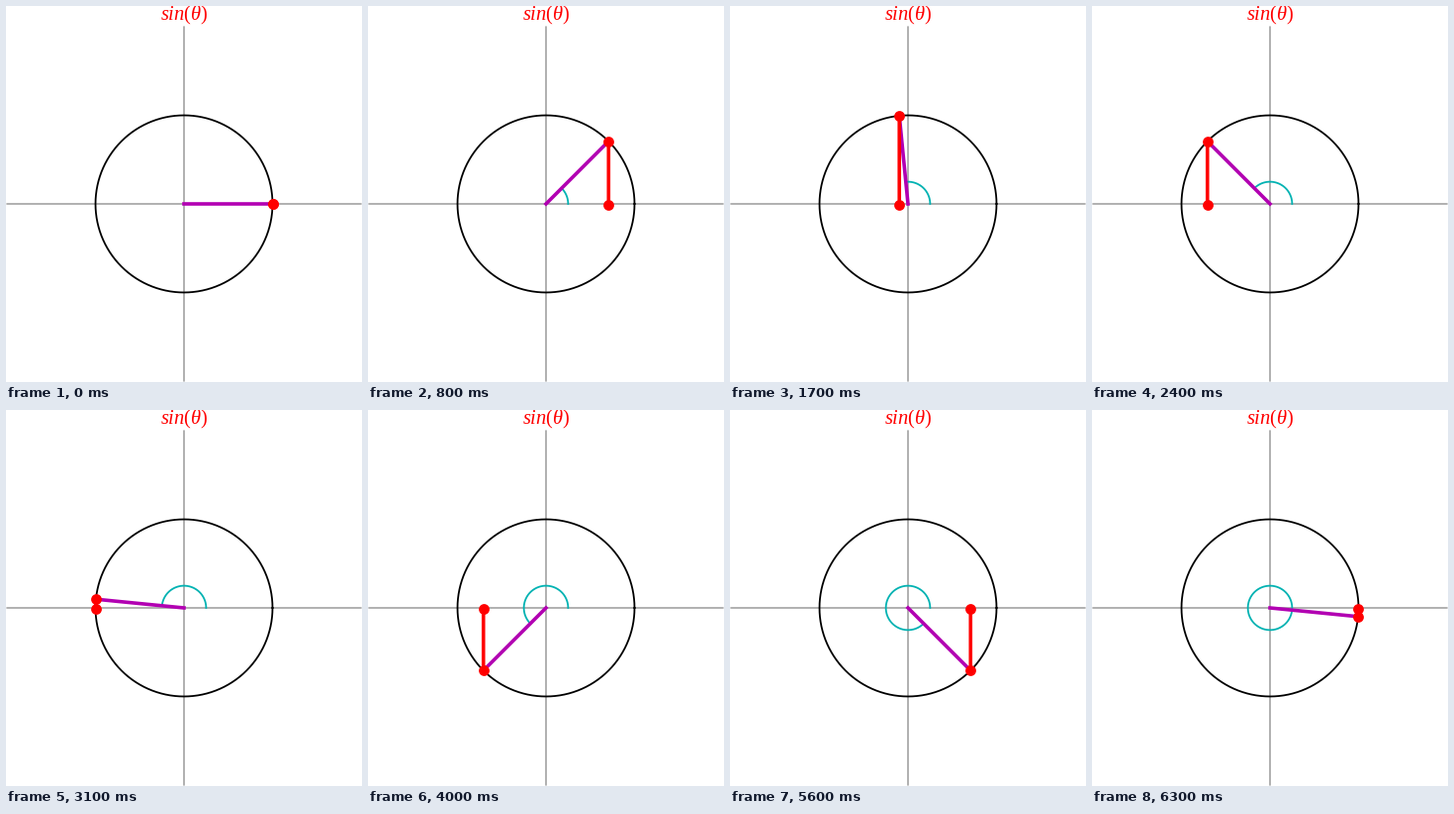
These frames come from a looping animation (360x380 px, 6400 ms). A matplotlib script:

```python
import numpy as np
import matplotlib.pyplot as plt
from matplotlib.animation import FuncAnimation

W, H, DPI = 360, 380, 100
PX = 72 / DPI  # points per pixel
CX, CY, R = 180, 200, 89.5
ARC_R = R / 4
FOOT_Y = CY + 0.5
FRAMES, INTERVAL = 64, 100

RED, PURPLE, TEAL = "#ff0000", "#b200b2", "#00b2b2"

plt.rcParams.update({
    "mathtext.fontset": "custom",
    "mathtext.it": "Liberation Serif:italic",
    "mathtext.rm": "Liberation Serif",
})

fig = plt.figure(figsize=(W / DPI, H / DPI), dpi=DPI, facecolor="white")
ax = fig.add_axes([0, 0, 1, 1])
ax.set_xlim(0, W)
ax.set_ylim(H, 0)
ax.axis("off")


def stroke(xs, ys, color, width, z):
    line, = ax.plot(xs, ys, color=color, lw=width * PX, zorder=z,
                    solid_capstyle="projecting", snap=False)
    return line


def dot():
    point, = ax.plot([], [], "o", color=RED, ms=10.8 * PX, mew=0,
                     zorder=6, snap=False)
    return point


def on_circle(angle, radius):
    return CX + radius * np.cos(angle), CY - radius * np.sin(angle)


stroke([1, W - 1], [CY, CY], "0.5", 1.2, 1)
stroke([CX, CX], [21, H - 1], "0.5", 1.2, 1)
stroke(*on_circle(np.linspace(0, 2 * np.pi, 361), R), "black", 1.8, 2)
ax.text(CX, 14.8, r"$sin(\theta)$", color=RED, fontsize=20.5 * PX,
        ha="center", va="baseline")

arc = stroke([], [], TEAL, 1.8, 3)
radius_line = stroke([], [], PURPLE, 3.6, 4)
sine_line = stroke([], [], RED, 3.6, 5)
tip, foot = dot(), dot()


def update(i):
    angle = 2 * np.pi * i / FRAMES
    x, y = on_circle(angle, R)
    sweep = np.linspace(0, angle, 2 + 3 * i) if i else np.array([])
    arc.set_data(*on_circle(sweep, ARC_R))
    radius_line.set_data([CX, x], [CY, y])
    sine_line.set_data([x, x], [CY, y])
    tip.set_data([x], [y])
    foot.set_data([x], [FOOT_Y if i else CY])
    return arc, radius_line, sine_line, tip, foot


anim = FuncAnimation(fig, update, frames=FRAMES, interval=INTERVAL,
                     repeat=True, repeat_delay=0)
plt.show()
```
